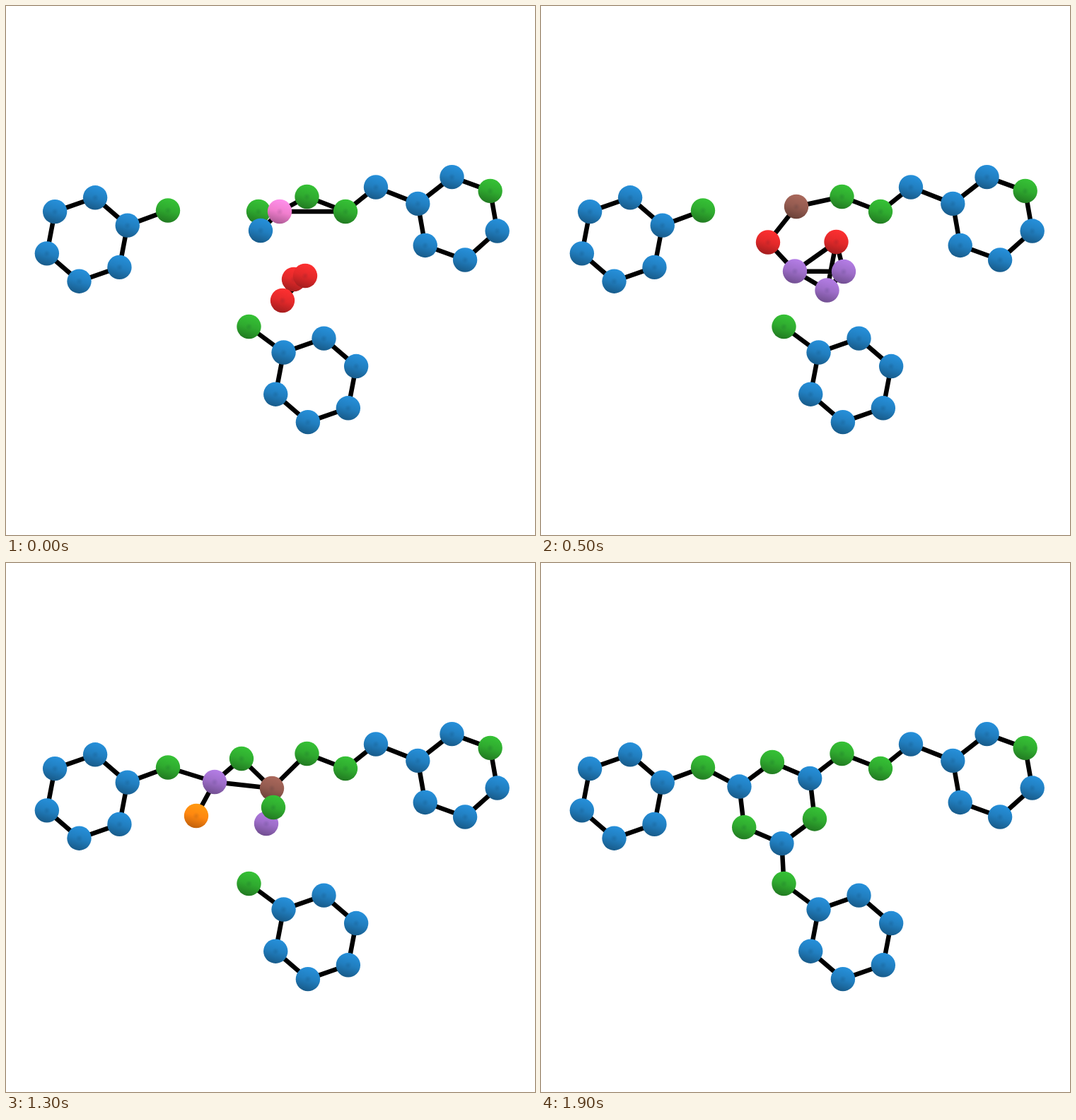
An HTML page with a canvas for the animation above (2.7 s loop, 748x749 px).

```html
<!DOCTYPE html>
<html lang="en">
<head>
<meta charset="utf-8">
<title>Molecule assembly</title>
<style>
html, body { margin: 0; width: 100%; height: 100%; overflow: hidden; background: #fff; }
canvas { display: block; }
</style>
</head>
<body>
<canvas id="stage" width="748" height="749"></canvas>
<script>
const ctx = document.getElementById('stage').getContext('2d');
const LOOP = 2700, STEP = 100, LAST = 1900, R = 17.2;

// Two atoms are bonded when they are closer than the sum of their reaches.
const KINDS = {
  b: { rgb: [31, 119, 180], reach: 32.2 },
  g: { rgb: [44, 160, 44], reach: 33 },
  r: { rgb: [214, 39, 40], reach: 27 },
  o: { rgb: [255, 127, 14], reach: 27 },
  p: { rgb: [148, 103, 189], reach: 45 },
  n: { rgb: [140, 86, 75], reach: 37.5 },
  k: { rgb: [227, 119, 194], reach: 60.5 }
};

const mix = (a, b, f) => a + (b - a) * f;
const atom = (kind, x, y) => ({ kind, x, y });

function ring(kinds, cx, cy, radius, turn) {
  return [...kinds].map((kind, i) => {
    const a = (turn + 60 * i) * Math.PI / 180;
    return atom(kind, cx + radius * Math.cos(a), cy + radius * Math.sin(a));
  });
}

const rightRing = ring('bbgbbb', 638.7, 300.4, 60, 200);
// bonds to the green corner are a little shorter
for (const i of [1, 3]) {
  rightRing[i].x = mix(rightRing[i].x, rightRing[2].x, 0.04);
  rightRing[i].y = mix(rightRing[i].y, rightRing[2].y, 0.04);
}
const fixed = [
  ...ring('bbbbbb', 114.8, 330.5, 60.3, -19.2),
  ...ring('bbbbbb', 438.2, 529.9, 60.3, -19.2),
  ...rightRing,
  atom('g', 229, 289.5), atom('g', 425.5, 270), atom('g', 480, 291),
  atom('b', 523, 256.5), atom('g', 343.5, 454)
];

// The six free atoms wander through a few key poses and settle into a ring.
const path = [
  { t: 0, pts: [[360, 318], [357, 291], [387, 291], [423, 382], [407, 387], [391, 417]] },
  { t: 200, pts: [[340, 348], [354, 276], [427, 331], [465, 422], [453, 412], [389, 406]] },
  { t: 800, pts: [[302, 321], [368, 292], [408, 337], [391, 330], [356, 393], [329, 345]] },
  { t: 1300, pts: [[295, 310], [333, 277], [376, 319], [378, 346], [368, 369], [269, 358]] },
  { t: LAST, pts: ring('bgbgbg', 333.7, 339.5, 58, 203.3).map(p => [p.x, p.y]) }
];
const guesses = {
  0: 'bgkrrr', 200: 'rnnpro', 500: 'rnrppp', 800: 'probgn',
  1300: 'pgngpo', 1500: 'kgpopo', [LAST]: 'bgbgbg'
};
const BACK_TO_FRONT = [1, 0, 4, 2, 3, 5];

function freeAtoms(t) {
  const i = Math.max(1, path.findIndex(key => key.t >= t));
  const from = path[i - 1], to = path[i];
  let f = (t - from.t) / (to.t - from.t);
  if (to.t === LAST) f = 1 - (1 - f) ** 3;
  const nearest = Object.keys(guesses).reduce((a, b) =>
    Math.abs(b - t) <= Math.abs(a - t) ? b : a);
  return BACK_TO_FRONT.map(k => atom(guesses[nearest][k],
    mix(from.pts[k][0], to.pts[k][0], f), mix(from.pts[k][1], to.pts[k][1], f)));
}

function drawAtom({ kind, x, y }) {
  const tone = f => `rgb(${KINDS[kind].rgb.map(v => Math.min(255, v * f))})`;
  const shade = ctx.createLinearGradient(x + 5, y - R, x - 5, y + R);
  shade.addColorStop(0, tone(1.22));
  shade.addColorStop(0.5, tone(1.06));
  shade.addColorStop(1, tone(0.75));
  const spot = ctx.createRadialGradient(x, y, 0, x, y, 5);
  spot.addColorStop(0, 'rgba(0,20,40,.12)');
  spot.addColorStop(1, 'rgba(0,20,40,0)');
  ctx.beginPath();
  ctx.arc(x, y, R, 0, Math.PI * 2);
  for (ctx.fillStyle of [shade, spot]) ctx.fill();
}

function drawBonds(atoms) {
  ctx.lineWidth = 6.5;
  ctx.beginPath();
  atoms.forEach((p, i) => {
    for (const q of atoms.slice(i + 1)) {
      const reach = KINDS[p.kind].reach + KINDS[q.kind].reach;
      if (Math.hypot(p.x - q.x, p.y - q.y) > reach) continue;
      ctx.moveTo(p.x, p.y);
      ctx.lineTo(q.x, q.y);
    }
  });
  ctx.stroke();
}

function render(now) {
  const t = Math.min(LAST, Math.floor((now % LOOP) / STEP) * STEP);
  const atoms = [...fixed, ...freeAtoms(t)];
  ctx.fillStyle = '#fff';
  ctx.fillRect(0, 0, 748, 749);
  drawBonds(atoms);
  atoms.forEach(drawAtom);
}

const start = performance.now();
function tick() {
  render(performance.now() - start);
  requestAnimationFrame(tick);
}
tick();
</script>
</body>
</html>
```
